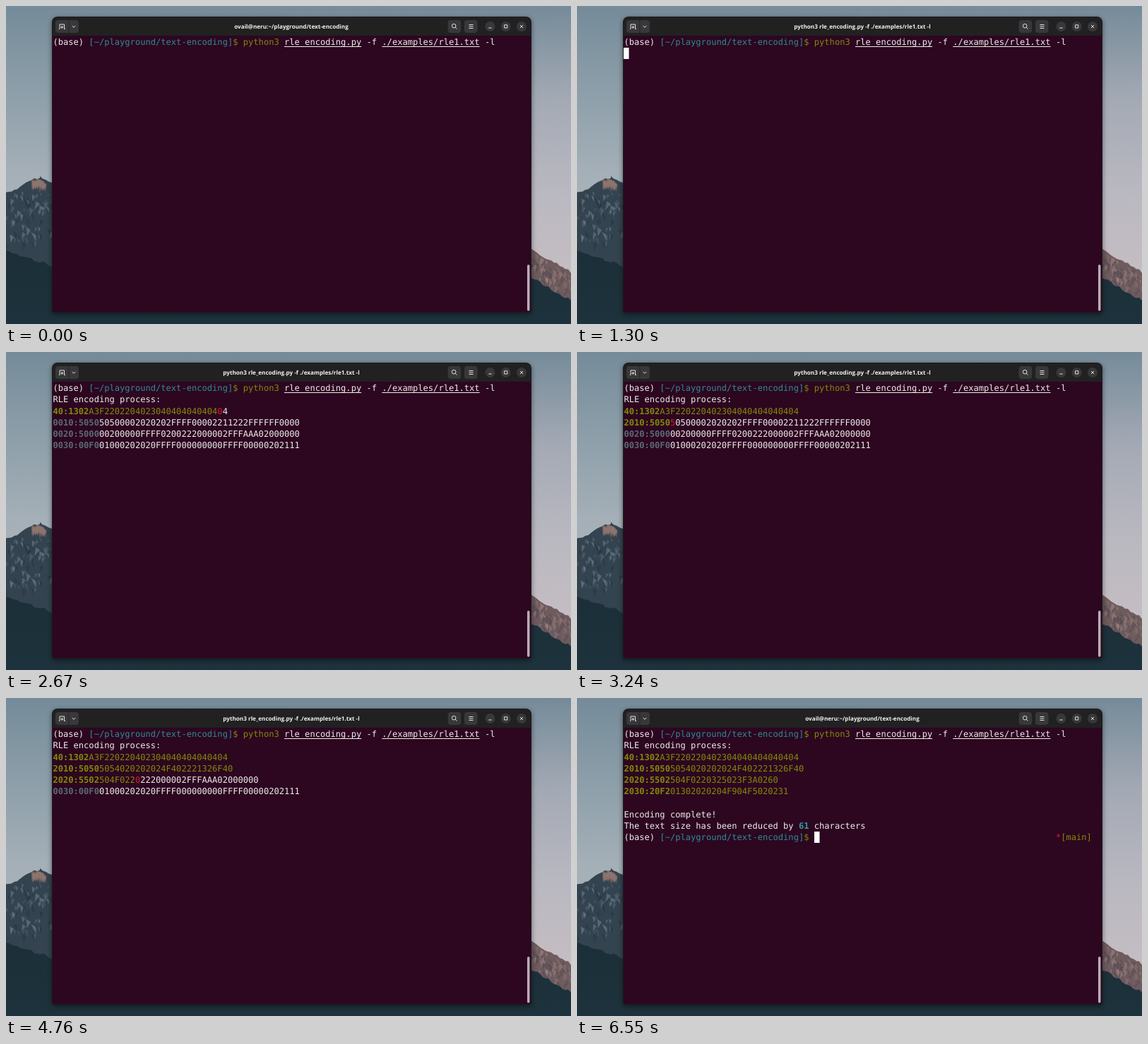
An HTML page with a canvas that plays this animation: 800x450 px, repeating every 6.58 s.

```html
<!DOCTYPE html>
<html lang="en">
<head>
<meta charset="utf-8">
<title>Run-length encoding</title>
<style>
html, body { margin: 0; width: 100%; height: 100%; overflow: hidden; background: #1b2c36; }
canvas { display: block; width: 800px; height: 450px; }
</style>
</head>
<body>
<canvas id="stage" width="800" height="450"></canvas>
<script>
const W = 800, H = 450, LOOP = 6580;
const ENTER = 650, START = 1316, STEP = 53.5;
const COL = 7.28, ROW = 16.23, LEFT = 66.4, MID = 50.9;
const MONO = '12.09px "DejaVu Sans Mono", monospace';
const INK = {
  white: '#ececea', olive: '#838a08', teal: '#2d8c93', cyan: '#2f9b9d',
  red: '#d01f35', gray: '#5b6a76'
};
const PREFIX = 9;
const SHELL_TITLE = 'ovail@neru:~/playground/text-encoding';
const RUN_TITLE = 'python3 rle_encoding.py -f ./examples/rle1.txt -l';
const DUMP = [
  '0000:' + '0'.repeat(13) + '2AFFF200200402000' + '40'.repeat(6) + '4',
  '0010:505050500002020202FFFF00002211222FFFFFF0000',
  '0020:500000200000FFFF0200222000002FFFAAA02000000',
  '0030:00F001000202020FFFF000000000FFFF00000202111'
];

const ctx = document.getElementById('stage').getContext('2d');

// Split a line into runs, each with its code and its place in the plain text.
function runs(text) {
  return [...text.matchAll(/(.)\1*/g)].map(m => {
    const size = m[0].length;
    return { code: (size > 1 ? size : '') + m[1], end: m.index + size, size };
  });
}

let steps = 0;
const lines = DUMP.map(text => {
  const line = { text, parts: runs(text), first: steps };
  steps += line.parts.length;
  return line;
});
const FINISH = START + steps * STEP;

function random(seed) {
  return () => (seed = seed * 16807 % 2147483647) / 2147483647;
}

function blend(g, height, ...colors) {
  const grad = g.createLinearGradient(0, 0, 0, height);
  colors.forEach((c, i) => grad.addColorStop(i / (colors.length - 1), c));
  return grad;
}

// Rough slope between two points, closed along the bottom edge.
function slope(g, x0, y0, x1, y1, rough, rand, fill) {
  g.beginPath();
  g.moveTo(x0, H);
  for (let x = x0; x <= x1; x += 4) {
    const y = y0 + (y1 - y0) * (x - x0) / (x1 - x0);
    g.lineTo(x, y + (rand() - 0.5) * rough);
  }
  g.lineTo(x1, H);
  g.fillStyle = fill;
  g.fill();
}

// Slanted patches of snow and shade that follow a slope.
function patches(g, x0, y0, x1, y1, depth, rand, tones) {
  for (let i = 0; i < 80; i++) {
    const u = rand(), size = 3 + rand() * 7;
    const x = x0 + (x1 - x0) * u;
    const y = y0 + (y1 - y0) * u + 3 + rand() * depth;
    g.globalAlpha = 0.25 + rand() * 0.4;
    g.fillStyle = tones[i % tones.length];
    g.beginPath();
    g.moveTo(x, y);
    g.lineTo(x + size * 0.6, y + size * 0.4);
    g.lineTo(x + size * (rand() - 0.3), y + size * 1.4);
    g.fill();
  }
  g.globalAlpha = 1;
}

function scenery(g) {
  const rand = random(71);
  g.fillStyle = blend(g, 350, '#758b99', '#8c9ea9', '#a4afb7', '#b3b5b9');
  g.fillRect(0, 0, W, H);
  g.fillStyle = blend(g, 390, '#758b99', '#a3a9b4', '#b9b8c0', '#c6bec3');
  g.fillRect(W / 2, 0, W / 2, H);

  slope(g, 0, 266, 48, 241, 5, rand, '#33434f');
  slope(g, 48, 241, 80, 258, 5, rand, '#33434f');
  patches(g, 36, 240, 54, 243, 7, rand, ['#8f766f']);
  patches(g, 0, 264, 64, 250, 75, rand, ['#7b8994', '#22323e', '#5d6c79']);

  slope(g, 740, 342, 804, 379, 4, rand, '#6d5b5e');
  patches(g, 740, 342, 800, 377, 34, rand, ['#a58581', '#4a4550', '#896f6d']);

  const dark = blend(g, H, '#182832', '#1b2c36', '#1d323c');
  slope(g, 0, 345, 100, 380, 5, rand, dark);
  slope(g, 740, 382, 804, 419, 4, rand, dark);
  g.fillStyle = dark;
  g.fillRect(60, 420, 700, 30);
}

function box(g, x, y, w, h, r, fill) {
  g.beginPath();
  g.roundRect(x, y, w, h, r);
  g.fillStyle = fill;
  g.fill();
}

function icon(g, path) {
  g.strokeStyle = '#e2e2e2';
  g.lineWidth = 1;
  g.stroke(new Path2D(path));
}

function frame(g) {
  g.save();
  g.shadowColor = 'rgba(0,0,0,.5)';
  g.shadowBlur = 7;
  g.shadowOffsetY = 2;
  box(g, 65, 15, 679, 419, [8, 8, 3, 3], '#1d1a1d');
  g.restore();
  box(g, 66, 16, 677, 26, [8, 8, 0, 0], '#212122');
  box(g, 66, 42, 677, 391, [0, 0, 3, 3], '#2d0620');
  box(g, 738, 366, 3.5, 65.5, 1.75, '#b9aeb6');

  const key = '#38383a';
  box(g, 70, 20, 18.5, 18, [4, 0, 0, 4], key);
  box(g, 89.3, 20, 13.7, 18, [0, 4, 4, 0], key);
  for (const x of [625.7, 649]) box(g, x, 20, 18.5, 18, 4, key);
  for (const x of [685.5, 707.7, 730]) box(g, x - 7, 22, 14, 14, 7, key);

  icon(g, 'M75 32.5h1v-6.5h6.5v6.5h1.5M77.3 30h4M79.3 28v4');
  icon(g, 'M93.7 28l2.3 2.3 2.3-2.3');
  icon(g, 'M637 28.2a2.8 2.8 0 1 0-5.6 0a2.8 2.8 0 1 0 5.6 0M636.2 30.2l2.3 2.3');
  icon(g, 'M655.5 26.5h6m-6 2.5h6m-6 2.5h6');
  icon(g, 'M683.3 31h4.4M705.6 26.8h4.2v4.2h-4.2z');
  icon(g, 'M728 27l4 4m0-4l-4 4');
}

const backdrop = document.createElement('canvas');
backdrop.width = W;
backdrop.height = H;
scenery(backdrop.getContext('2d'));
frame(backdrop.getContext('2d'));

// Print text on the terminal grid and return the next free column.
function put(row, col, text, color, bold) {
  ctx.font = (bold ? 'bold ' : '') + MONO;
  ctx.fillStyle = INK[color];
  for (const ch of text) {
    if (ch !== ' ') ctx.fillText(ch, LEFT + col * COL, MID + 4.3 + row * ROW);
    col++;
  }
  return col;
}

function link(row, col, text) {
  const end = put(row, col, text, 'white');
  ctx.fillRect(LEFT + col * COL, Math.round(MID + 6 + row * ROW), text.length * COL, 1);
  return end;
}

function cursor(row, col) {
  ctx.fillStyle = '#ffffff';
  ctx.fillRect(Math.round(LEFT + col * COL), Math.round(MID - 8 + row * ROW), 7.5, 16);
}

function prompt(row) {
  let col = put(row, 0, '(base) ', 'white');
  col = put(row, col, '[~/playground/text-encoding]', 'teal');
  return put(row, col, '$ ', 'olive');
}

function command() {
  let col = put(0, prompt(0), 'python3 ', 'olive');
  col = link(0, col, 'rle_encoding.py');
  col = put(0, col, ' -f ', 'white');
  col = link(0, col, './examples/rle1.txt');
  put(0, col, ' -l', 'white');
}

// Encoded runs replace the plain text in place; the newest character is red.
function dumpLine(row, line, step) {
  const now = step - line.first;
  const busy = now >= 0 && now < line.parts.length;
  let code = '', used = 0, bold = PREFIX;
  for (const p of line.parts.slice(0, Math.max(0, now + 1))) {
    code += p.code;
    used = p.end;
    if (p.end <= PREFIX) bold -= p.size - p.code.length;
  }
  const mark = busy ? code.length - 1 : -1;
  const shown = code + line.text.slice(used);
  [...shown].forEach((ch, i) => {
    const color = i === mark ? 'red' : i < code.length ? 'olive' : i < bold ? 'gray' : 'white';
    put(row, i, ch, color, i < bold);
  });
}

function summary() {
  put(7, 0, 'Encoding complete!', 'white');
  let col = put(8, 0, 'The text size has been reduced by ', 'white');
  col = put(8, col, '61', 'cyan', true);
  put(8, col, ' characters', 'white');
  cursor(9, prompt(9));
  put(9, put(9, 84, '*', 'red'), '[main]', 'olive');
}

function draw(t) {
  ctx.drawImage(backdrop, 0, 0);
  ctx.textAlign = 'center';
  ctx.font = 'bold 8.14px "Open Sans", sans-serif';
  ctx.fillStyle = '#f2f2f2';
  ctx.fillText(t >= ENTER && t < FINISH ? RUN_TITLE : SHELL_TITLE, 404, 31.6);

  ctx.textAlign = 'left';
  command();
  if (t < ENTER) return;
  if (t < START) {
    cursor(1, 0);
    return;
  }
  put(1, 0, 'RLE encoding process:', 'white');
  const step = Math.floor((t - START) / STEP);
  lines.forEach((line, i) => dumpLine(2 + i, line, step));
  if (t >= FINISH) summary();
}

ctx.textRendering = 'geometricPrecision';
const begin = performance.now();
function tick() {
  draw((performance.now() - begin) % LOOP);
  requestAnimationFrame(tick);
}
draw(0);
requestAnimationFrame(tick);
</script>
</body>
</html>
```
